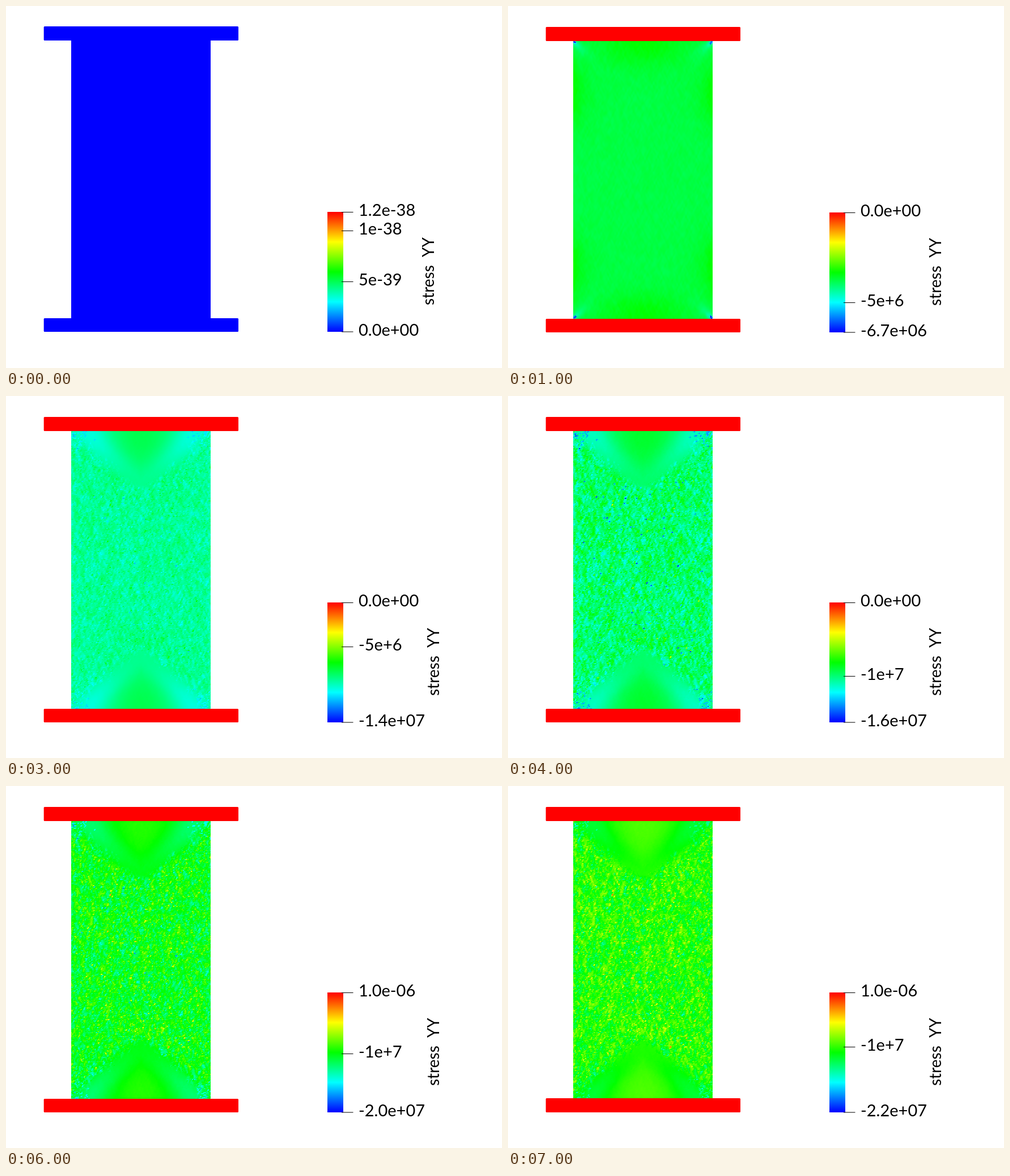
Animation of 875 by 640 pixels, one loop 8 s. Source, as an HTML page with a canvas:

```html
<!DOCTYPE html>
<html lang="en">
<head>
<meta charset="utf-8">
<title>Column compression, stress YY</title>
<style>
html, body { margin: 0; width: 100%; height: 100%; overflow: hidden; background: #fff; }
canvas { display: block; }
</style>
</head>
<body>
<canvas id="stage" width="875" height="640"></canvas>
<script>
const ctx = document.getElementById('stage').getContext('2d');
const W = 246, H = 491, LEFT = 115, STEP = 1000;

// Hues run from 0 (red) to 240 (blue). Ticks are [label, y].
// Elastic states have side and corner bands; rough ones have cones and grain.
const states = [
  { top: '1.2e-38', bottom: '0.0e+00', ticks: [['1e-38', 397], ['5e-39', 487]], flat: true },
  { top: '0.0e+00', bottom: '-6.7e+06', ticks: [['-5e+6', 524]],
    base: 136, cap: -16, side: -19, lobe: true, band: 42, reach: 17, core: 6 },
  { top: '0.0e+00', bottom: '-1.1e+07', ticks: [['-5e+6', 458]],
    base: 151, cap: -17, side: -11, band: 38, reach: 28, core: 17 },
  { top: '0.0e+00', bottom: '-1.4e+07', ticks: [['-5e+6', 443]],
    base: 156, cap: -18, band: 18, noise: 11, specks: 25 },
  { top: '0.0e+00', bottom: '-1.6e+07', ticks: [['-1e+7', 495]],
    base: 147, cap: -17, band: 20, noise: 20, specks: 55 },
  { top: '0.0e+00', bottom: '-1.8e+07', ticks: [['-1e+7', 483]],
    base: 134, cap: -14, band: 21, noise: 22, specks: 52 },
  { top: '1.0e-06', bottom: '-2.0e+07', ticks: [['-1e+7', 473]],
    base: 125, cap: -13, band: 22, noise: 24, specks: 48 },
  { top: '1.0e-06', bottom: '-2.2e+07', ticks: [['-1e+7', 461]], lift: 1,
    base: 114, cap: -12, band: 19, noise: 23, specks: 35 }
];
states[5].top = '1.0e-06';

const clamp = (v, lo = 0, hi = 1) => Math.min(hi, Math.max(lo, v));
const bell = v => Math.exp(-v * v);

function hash(x, y) {
  let n = Math.imul(x, 374761393) + Math.imul(y, 668265263);
  n = Math.imul(n ^ (n >>> 13), 1274126177);
  return ((n ^ (n >>> 16)) >>> 0) / 4294967296;
}

// Bilinear value noise in [-1, 1]
function smooth(u, v) {
  const i = Math.floor(u), j = Math.floor(v), a = u - i, b = v - j;
  const top = hash(i, j) * (1 - a) + hash(i + 1, j) * a;
  const low = hash(i, j + 1) * (1 - a) + hash(i + 1, j + 1) * a;
  return 2 * (top * (1 - b) + low * b) - 1;
}

// Crossing steep streaks, fine mesh cells and rare specks
const grain = [];
for (let y = 0; y < H; y++) {
  for (let x = 0; x < W; x++) {
    const streak =
      smooth((x * 0.91 - y * 0.42) / 2.8, (x * 0.42 + y * 0.91) / 10) +
      smooth((x * 0.91 + y * 0.42) / 2.8 + 500, (y * 0.91 - x * 0.42) / 10);
    const i = Math.floor((x + y * 0.5) / 2.5), j = Math.floor(y / 2.3);
    grain.push({ streak, cell: 2 * hash(i + 900, j) - 1, speck: hash(i, j + 700) });
  }
}

function elasticHue(s, g, dx, dy, cx, r) {
  if (r < s.core && Math.abs(dx - dy) < 2 + s.core / 7) return 185 + 60 * g.speck;
  const sideFade = s.lobe ? bell((dy - 92) / 55) : 1 - bell(dy / 35);
  return s.base + g.streak * 2
    + s.band * bell((dx - dy) / (5 + r * 0.35)) * Math.exp(-r / s.reach)
    + s.cap * bell(cx / 75) * bell(dy / 42)
    + s.side * Math.exp(-dx / (s.lobe ? 18 : 35)) * sideFade;
}

function roughHue(s, g, dx, dy, cx, r) {
  const cone = cx / 112 + Math.pow(dy / 106, 1.3);
  const outside = clamp((cone - 0.92 + g.streak * 0.07) * 5);
  let hue = s.base + s.cap * bell(cx / 60) * bell(dy / 85)
    + s.band * bell((cone - 0.8) / 0.28) * bell(dy / 70)
    + s.noise * (0.04 + outside) * (0.8 * g.streak + 1.1 * g.cell ** 3);
  const rare = 0.012 * bell(cx / 85);
  if (g.speck > 1 - rare) hue += s.specks * outside;
  if (g.speck < rare) hue -= s.noise * 2 * outside;
  else if (g.speck < 0.3 * bell(r / 24)) hue += s.specks * 0.7;
  return hue;
}

function paintField(s) {
  const tile = document.createElement('canvas');
  tile.width = W;
  tile.height = H;
  const tc = tile.getContext('2d'), img = tc.createImageData(W, H);
  const hueAt = s.noise ? roughHue : elasticHue;
  for (let p = 0; p < W * H; p++) {
    const x = p % W, y = Math.floor(p / W);
    const dx = Math.min(x, W - 1 - x), dy = Math.min(y, H - 1 - y);
    const hue = hueAt(s, grain[p], dx, dy, Math.abs(x - W / 2), Math.hypot(dx, dy));
    const h = clamp(hue, 0, 240) / 60;
    img.data[p * 4] = 255 * clamp(2 - h);
    img.data[p * 4 + 1] = 255 * Math.min(clamp(h), clamp(4 - h));
    img.data[p * 4 + 2] = 255 * clamp(h - 2);
    img.data[p * 4 + 3] = 255;
  }
  tc.putImageData(img, 0, 0);
  return tile;
}

function plate(top, bottom, color) {
  ctx.fillStyle = color;
  ctx.beginPath();
  ctx.roundRect(66.7, top, 343.3, bottom - top, 1.5);
  ctx.fill();
}

function tick(label, y) {
  ctx.fillStyle = '#000';
  ctx.fillRect(592, y, 20.5, 1);
  ctx.font = '29px Lato, sans-serif';
  ctx.fillText(label, 622, y + 7);
}

function legend(s) {
  const top = s.flat ? 364 : 365, bottom = top + 212;
  const ramp = ctx.createLinearGradient(0, top, 0, bottom);
  ['#f00', '#ff0', '#0f0', '#0ff', '#00f'].forEach((c, i) => ramp.addColorStop(i / 4, c));
  ctx.fillStyle = ramp;
  ctx.fillRect(567, top, 28, bottom - top);
  tick(s.top, top);
  s.ticks.forEach(t => tick(...t));
  tick(s.bottom, bottom - 0.5);
  ctx.save();
  ctx.translate(s.flat ? 755 : 764, top + 165);
  ctx.rotate(-Math.PI / 2);
  ctx.font = '28px Lato, sans-serif';
  ctx.fillText('stress', 0, 0);
  ctx.fillText('YY', 85, 0);
  ctx.restore();
}

function draw(s) {
  ctx.fillStyle = '#fff';
  ctx.fillRect(0, 0, 875, 640);
  const color = s.flat ? '#00f' : '#f00', up = s.flat ? 1 : 0;
  if (s.flat) {
    ctx.fillStyle = color;
    ctx.fillRect(LEFT, 60, W, 494);
  } else {
    ctx.drawImage(s.field, LEFT, 62);
  }
  plate(37 - up, 62 - up, color);
  plate(553 - up - (s.lift || 0), 577 - up, color);
  legend(s);
}

for (const s of states) if (!s.flat) s.field = paintField(s);

const start = performance.now();
let shown = -1;
function play() {
  const index = Math.floor((performance.now() - start) / STEP) % states.length;
  if (index !== shown) draw(states[shown = index]);
  requestAnimationFrame(play);
}
play();
</script>
</body>
</html>
```
